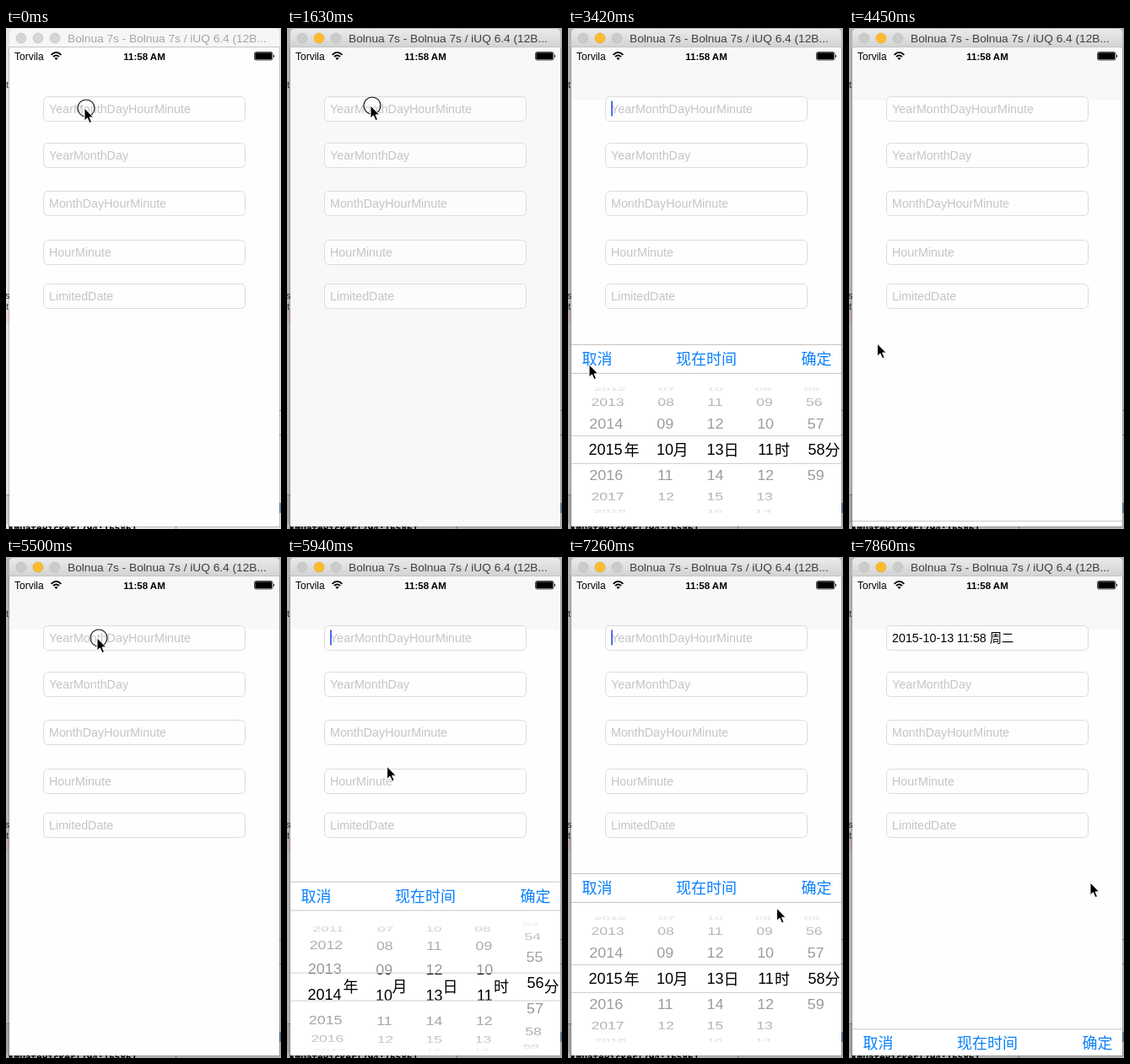
Animation of 326 by 594 pixels, one loop 8000 ms. Source, as an HTML page:

```html
<!DOCTYPE html>
<html lang="en">
<head>
<meta charset="utf-8">
<title>Date picker demo</title>
<style>
  html, body { margin: 0; width: 100%; height: 100%; overflow: hidden; background: #fff; }
  svg { display: block; width: 326px; height: 594px; }
  text { font-family: "Liberation Sans", "Noto Sans CJK SC", "Noto Sans CJK", sans-serif; }
  .mono { font: bold 11px "DejaVu Sans Mono", monospace; }
  .cjk { font-family: "Noto Sans CJK SC", "Noto Sans CJK", sans-serif; font-size: 18px; }
  .mid { text-anchor: middle; }
  .field { font-size: 14.3px; }
</style>
</head>
<body>
<svg viewBox="0 0 326 594">
  <defs>
    <linearGradient id="activeBar" x2="0" y2="1">
      <stop stop-color="#ebebeb"/><stop offset="1" stop-color="#d2d2d2"/>
    </linearGradient>
    <linearGradient id="fade" x2="0" y2="1">
      <stop offset=".06" stop-color="#fff"/>
      <stop offset=".11" stop-color="#fff" stop-opacity=".6"/>
      <stop offset=".2" stop-color="#fff" stop-opacity=".25"/>
      <stop offset=".35" stop-color="#fff" stop-opacity="0"/>
      <stop offset=".65" stop-color="#fff" stop-opacity="0"/>
      <stop offset=".8" stop-color="#fff" stop-opacity=".25"/>
      <stop offset=".89" stop-color="#fff" stop-opacity=".6"/>
      <stop offset=".94" stop-color="#fff"/>
    </linearGradient>
    <clipPath id="screenClip"><rect x="4" y="23" width="320" height="568"/></clipPath>
    <clipPath id="wheelClip"><rect x="4" y="35" width="320" height="181"/></clipPath>
    <clipPath id="bandClip"><rect x="4" y="109" width="320" height="32"/></clipPath>
  </defs>

  <!-- desktop behind the window -->
  <rect width="326" height="594" fill="#ececec"/>
  <rect y="333" width="4" height="17" fill="#f3dbe6"/>
  <rect y="554" width="4" height="34" fill="#d4d4d4"/>
  <g font-size="11" fill="#333"><text x="0" y="71">t</text><text x="-1" y="321">s</text><text x="0" y="334">t</text></g>
  <path d="M0 553.5H4M324 453.5H326M324 482.5H326M201.5 590V594" stroke="#999"/>
  <rect x="324" y="563" width="2" height="12" fill="#7d9fc6"/>
  <rect id="shade" width="326" height="594"/>
  <text class="mono" x="3" y="597">KMDatePicker[794:165861</text>

  <!-- window -->
  <path id="bar" d="M4 23V6q0-5 5-5H319q5 0 5 5V23Z"/>
  <path d="M4 22.5H324" stroke="#c4c4c4"/>
  <g id="dots" stroke-width=".6"></g>
  <text id="title" x="73" y="17" font-size="13.7">Bolnua 7s - Bolnua 7s / iUQ 6.4 (12B...</text>

  <g clip-path="url(#screenClip)">
    <rect id="lower" x="4" y="23" width="320" height="568"/>
    <rect id="upper" x="4" y="23" width="320" height="63"/>
    <text x="10" y="37.5" font-size="12">Torvila</text>
    <g fill="none" stroke="#000" stroke-width="1.8">
      <path d="M53.6 31.8Q59.5 26 65.4 31.8M55.9 34.2Q59.5 30.7 63.1 34.2"/>
    </g>
    <path d="M57.4 35.8Q59.5 34 61.6 35.8L59.5 38Z"/>
    <text class="mid" x="164" y="37.7" font-size="11.5" font-weight="bold">11:58 AM</text>
    <rect x="294.5" y="28.5" width="21.5" height="9.5" rx="2" fill="none" stroke="#000" stroke-width=".7"/>
    <rect x="295.3" y="29.3" width="19.9" height="7.9" rx="1"/>
    <path d="M317 31.5q2.4 1.8 0 3.6Z"/>
    <g id="fields"></g>
    <rect id="caret" x="51" y="86.5" width="2" height="18" fill="#4a6cf0"/>

    <g id="picker">
      <rect x="4" width="320" height="220" fill="#fff"/>
      <path d="M4 .5H324M4 34.5H324" stroke="#c3c3c3"/>
      <g class="cjk" fill="#0a80fb">
        <text x="16.5" y="24">取消</text><text x="128" y="24">现在时间</text><text x="276.5" y="24">确定</text>
      </g>
      <g clip-path="url(#wheelClip)">
        <g fill="#989898"><g id="rows" class="mid" font-size="18"></g></g>
        <rect x="4" y="35" width="320" height="181" fill="url(#fade)"/>
        <rect x="4" y="108" width="320" height="34" fill="#fff"/>
        <path d="M4 108.5H324M4 141.5H324" stroke="#cfcfcf"/>
        <use href="#rows" clip-path="url(#bandClip)"/>
        <g id="units" class="cjk mid"></g>
      </g>
    </g>
  </g>
  <path d="M3.5 23V591.5H324.5V23" fill="none" stroke="#000" stroke-opacity=".16"/>

  <g id="pointer">
    <circle id="ring" cx="2" r="10" fill="none" stroke="#111" stroke-width="1.1"/>
    <path d="M0 0V15L3.4 11.8L6 17.6L8.5 16.5L6 10.9H10.6Z" stroke="#fff" stroke-width="1"/>
  </g>
</svg>
<script>
const LOOP = 8000, STEP = 148.4;
const OPEN = [1850, 5640], CLOSE = [4130, 7659];
const ACTIVE_AT = 1625, VALUE_AT = 7555;
const PRESSES = [[0, 1700], [4000, 4200], [5330, 5640], [6370, 6600], [7400, 7640]];
const PATH = [
  [0, 93, 95], [440, 99, 92], [2230, 99, 92], [2670, 147, 285], [3110, 85, 375],
  [3410, 25, 399], [4300, 25, 399], [4600, 42, 350], [5050, 100, 135], [5340, 108, 96],
  [5650, 108, 96], [6080, 124, 325], [6230, 132, 386], [6600, 132, 386], [6830, 165, 447],
  [7260, 286, 402], [7410, 290, 387], [7560, 286, 386]
];
// lag is how many rows a wheel still has to turn when the picker is nearly up
const WHEELS = [
  { x: 44.5, value: 2015, min: 1970, max: 2050, lag: .32, unit: "年", unitX: 75.5 },
  { x: 115, value: 10, min: 1, max: 12, lag: .08, unit: "月", unitX: 133.5 },
  { x: 174.5, value: 13, min: 1, max: 31, lag: .08, unit: "日", unitX: 193.5 },
  { x: 234.5, value: 11, min: 0, max: 23, lag: .08, unit: "时", unitX: 254 },
  { x: 294.5, value: 58, min: 0, max: 59, lag: .45, unit: "分", unitX: 313.5 }
];
const FIELDS = [[81, "YearMonthDayHourMinute"], [136, "YearMonthDay"], [193, "MonthDayHourMinute"],
  [251, "HourMinute"], [303, "LimitedDate"]];
const RADIUS = 77, ROW_ANGLE = .408, CENTER_X = 164, CENTER_Y = 125;

const $ = id => document.getElementById(id);
const set = (id, attrs) => { for (const k in attrs) $(id).setAttribute(k, attrs[k]); };

$("fields").innerHTML = FIELDS.map(([y, label], i) =>
  `<rect x="44.5" y="${y + .5}" width="239" height="29" rx="5" fill="#fff" fill-opacity=".6" stroke="#dcdcdc"/>
   <text class="field" x="51" y="${y + 20}" fill="#c5c5c9" id="label${i}">${label}</text>`).join("");
$("units").innerHTML = WHEELS.map(w => `<text x="${w.unitX}" y="131.5">${w.unit}</text>`).join("");

const spring = e => { const p = Math.max(0, e) * .0165; return 1 - (1 + p) * Math.exp(-p); };
const total = (starts, t) => starts.reduce((sum, s) => sum + spring(t - s), 0);

function pointerAt(t) {
  const i = PATH.findIndex(p => p[0] > t);
  if (i < 0) return PATH[PATH.length - 1].slice(1);
  const [t0, x0, y0] = PATH[i - 1], [t1, x1, y1] = PATH[i];
  const k = (t - t0) / (t1 - t0);
  return [x0 + (x1 - x0) * k, y0 + (y1 - y0) * k];
}

function caretOpacity(age) {
  const p = age % 1000 / 1000;
  if (p < .57) return 1;
  return p < .62 ? (.62 - p) / .05 : Math.max(0, (p - .95) / .05);
}

function wheelRows(wheel, age) {
  const center = wheel.value - wheel.lag * Math.exp((380 - Math.max(0, age)) / 60);
  const nearest = Math.round(center);
  let out = "";
  for (let n = nearest - 4; n <= nearest + 4; n++) {
    const angle = (n - center) * ROW_ANGLE;
    if (n < wheel.min || n > wheel.max || Math.abs(angle) > 1.5) continue;
    const squash = Math.cos(angle);
    const depth = 1 / (1 + RADIUS * (1 - squash) / 1100);
    const x = CENTER_X + (wheel.x - CENTER_X) * depth;
    const y = CENTER_Y + RADIUS * Math.sin(angle);
    out += `<text transform="translate(${x} ${y}) scale(${depth} ${squash})" y="6.4">${String(n).padStart(2, "0")}</text>`;
  }
  return out;
}

function draw(t) {
  const active = t >= ACTIVE_AT;
  set("shade", { opacity: active ? .24 : .04 });
  set("bar", { fill: active ? "url(#activeBar)" : "#f6f6f6" });
  set("title", { fill: active ? "#3f3f3f" : "#a5a5a5" });
  $("dots").innerHTML = [18, 38, 58].map(x => {
    const lit = active && x === 38;
    return `<circle cx="${x}" cy="12" r="6" fill="${lit ? "#fdbc2e" : active ? "#cbcbcb" : "#d6d6d6"}" stroke="${lit ? "#dfa023" : "#bdbdbd"}"/>`;
  }).join("");
  set("upper", { fill: active ? "#f8f8f8" : "#fefefe" });
  set("lower", { fill: active && t < 1770 ? "#f8f8f8" : "#fefefe" });

  const filled = t >= VALUE_AT;
  $("label0").textContent = filled ? "2015-10-13 11:58 周二" : FIELDS[0][1];
  set("label0", { fill: filled ? "#000" : "#c5c5c9" });

  const opened = t >= OPEN[1] ? OPEN[1] : OPEN[0];
  const editing = t >= opened && t < (opened === OPEN[0] ? CLOSE[0] : VALUE_AT);
  set("caret", { opacity: editing ? caretOpacity(t - opened) : 0 });

  const lift = total(OPEN, t) - total(CLOSE, t);
  set("picker", { transform: `translate(0 ${591 - 216 * lift})`, visibility: lift > .002 ? "visible" : "hidden" });
  $("rows").innerHTML = WHEELS.map(w => wheelRows(w, t - opened)).join("");

  set("pointer", { transform: `translate(${pointerAt(t)})` });
  set("ring", { opacity: PRESSES.some(([a, b]) => t >= a && t < b) ? 1 : 0 });
}

const start = performance.now();
let shown = -1;
function tick() {
  const tickIndex = Math.floor(((performance.now() - start) % LOOP + 10) / STEP);
  if (tickIndex !== shown) {
    shown = tickIndex;
    draw(tickIndex * STEP);
  }
  requestAnimationFrame(tick);
}
tick();
</script>
</body>
</html>
```
